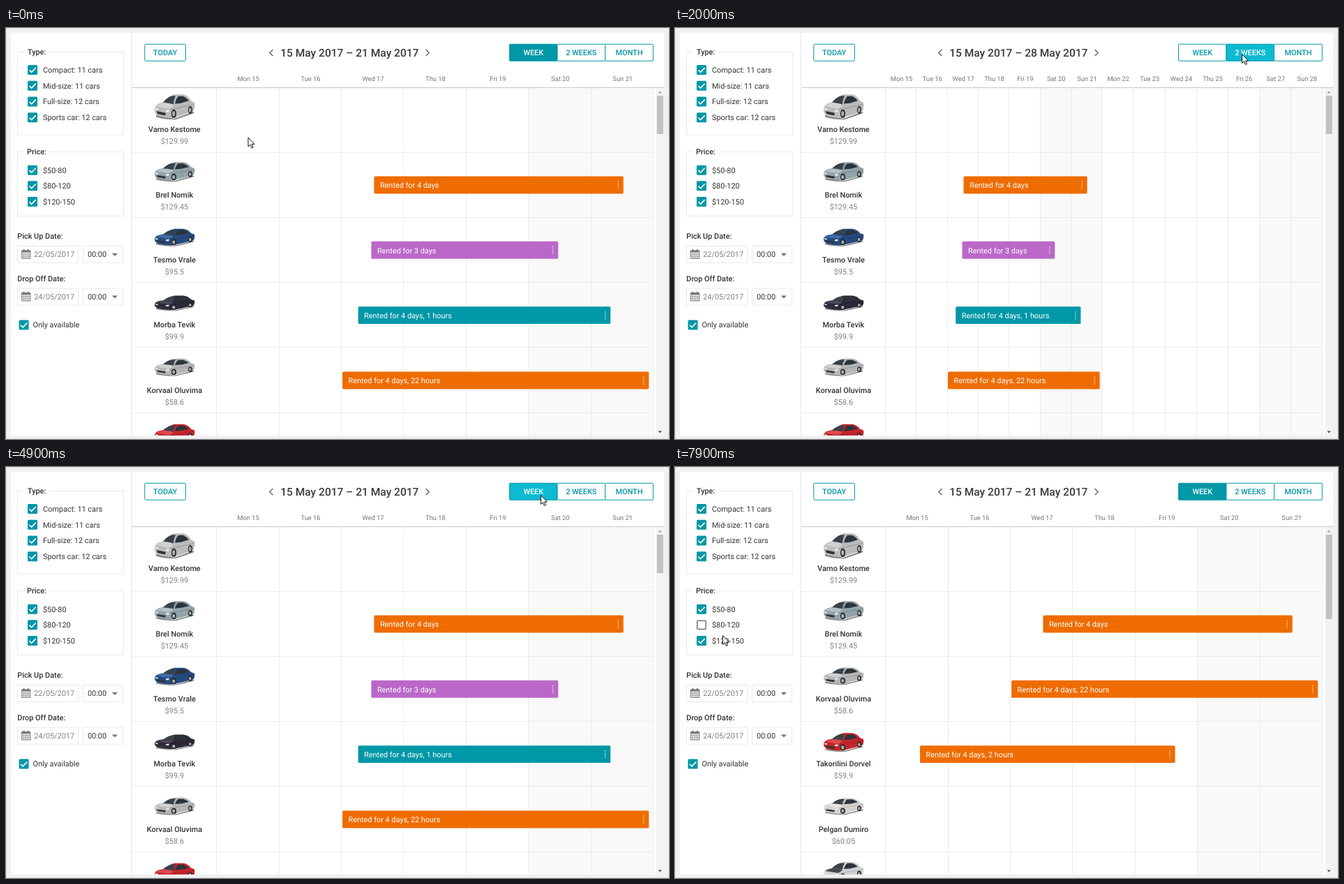
An HTML page that plays this animation: 950x589 px, repeating every 8000 ms.

```html
<!DOCTYPE html>
<html lang="en">
<head>
<meta charset="utf-8">
<title>Car rental timeline</title>
<style>
  html, body { margin: 0; width: 100%; height: 100%; overflow: hidden; background: #f1f1f1; }
  svg { display: block; width: 100vw; height: 100vh; }
  text { font: 10.885px Roboto, sans-serif; fill: #333; text-rendering: geometricPrecision; white-space: pre; }
  .mid { text-anchor: middle; }
  .med { font-weight: 500; }
  .soft { fill: #808080; }
  .day { font-size: 9.33px; fill: #757575; }
  .title { font-size: 15.55px; font-weight: 500; fill: #3a3a3a; }
  .white { fill: #fff; }
  .teal { fill: #0097a7; }
  .frame { fill: none; stroke: #e9e9e9; }
</style>
</head>
<body>
<svg id="stage" viewBox="0 0 950 589" xmlns="http://www.w3.org/2000/svg"></svg>
<script>
const TEAL = '#0097a7', HOVER = '#0cbad1', ORANGE = '#ef6c00', PURPLE = '#ba68c8';
const LEFT = 301.6, TOP = 84.7, ROW = 93.32, LOOP = 8000;

const rect = (x, y, w, h, fill, extra = '') =>
  `<rect x="${x}" y="${y}" width="${w}" height="${h}" fill="${fill}" ${extra}/>`;
const text = (x, y, str, cls = '') => `<text x="${x}" y="${y}" class="${cls}">${str}</text>`;
const path = (d, fill, extra = '') => `<path d="${d}" fill="${fill}" ${extra}/>`;
const range = (n, fn) => Array.from({ length: n }, (_, i) => fn(i)).join('');

// ---- cars and rows ----
const wheel = (x, y, rx, ry) =>
  `<ellipse cx="${x}" cy="${y}" rx="${rx}" ry="${ry}" fill="#222"/>` +
  `<ellipse cx="${x - .2}" cy="${y}" rx="${rx * .6}" ry="${ry * .62}" fill="#a9adb0"/>`;

function car(y, h, paint, roof) {
  return `<g transform="translate(211 ${y}) scale(1 ${h / 28})">` +
    path('M4 24L30 28L58 20L58 22L32 29Q16 29 4 26Z', '#333', 'opacity=".6"') +
    path('M2 18Q2 13 8 11L17 9Q24 2 31 1L43 1Q50 2 54 8L59 10Q60 15 58 19L52 21L30 27Q20 28 8 25Q2 23 2 18Z', paint) +
    path('M4 14Q9 11 16 10L29 12Q27 16 22 17Z', roof) +
    path('M14 10Q21 3 28 2.6L32 2.6Q29 8 29 12Q20 10 14 10Z', '#39424a') +
    path('M31 11.3Q33 5 36 3L43 3Q48 5 51 8L40 10.6Z', '#2c343b') +
    path('M24 18L58 12', 'none', 'stroke="#0003" stroke-width=".8"') +
    path('M5 19.5L18 21.5L17 24.5L6 22.5Z', '#30343a') +
    path('M3 16l4 .6l-.6 2l-3-.6zM18 18.4l5-.6l-1 3l-4-.4z', '#e8ecee') +
    wheel(29.5, 22.4, 3.6, 4.8) + wheel(53, 18.2, 3, 4.2) + '</g>';
}

const model = (name, price, top, h, paint, roof, bar) => ({ name, price, top, h, paint, roof, bar });
const rental = (from, to, color, label, brief) => ({ from, to, color, label, brief });

const varno = model('Varno Kestome', '$129.99', 9.3, 36, '#b9bbbc', '#d0d2d3');
const brel = model('Brel Nomik', '$129.45', 13.2, 28, '#93a3ab', '#b4c1c7',
  rental(2.525, 6.52, ORANGE, 'Rented for 4 days', 'Rented for…'));
const tesmo = model('Tesmo Vrale', '$95.5', 15.6, 25, '#254a80', '#3f6aa3',
  rental(2.48, 5.475, PURPLE, 'Rented for 3 days', 'Rente…'));
const morba = model('Morba Tevik', '$99.9', 18, 22, '#2b2838', '#4a4658',
  rental(2.27, 6.313, TEAL, 'Rented for 4 days, 1 hours', 'Rented for …'));
const korvaal = model('Korvaal Oluvima', '$58.6', 15, 25, '#b5b6b5', '#d0d1d0',
  rental(2.018, 6.928, ORANGE, 'Rented for 4 days, 22 hours', 'Rented for 4 d…'));
const takori = model('Takorilini Dorvel', '$59.9', 15.6, 27, '#c3262b', '#dc4a4c',
  rental(.553, 4.64, ORANGE, 'Rented for 4 days, 2 hours'));
const pelgan = model('Pelgan Dumiro', '$60.05', 15.6, 24, '#d3d2cd', '#e6e5e1');
const last = model('', '', 13.5, 28, '#cfd1d3', '#45484c');

const ALL = [varno, brel, tesmo, morba, korvaal, takori];
const FILTERED = [varno, brel, korvaal, takori, pelgan, last];

// ---- timeline views ----
const DAYS = ['Mon', 'Tue', 'Wed', 'Thu', 'Fri', 'Sat', 'Sun'];
const VIEWS = [
  { days: 7, first: 15, shift: 0, at: d => LEFT + d * 89.43, title: '15 May 2017 – 21 May 2017' },
  { days: 14, first: 15, shift: 0, at: d => LEFT + d * 44.32 + Math.max(0, d - 7) * .78, title: '15 May 2017 – 28 May 2017' },
  { days: 31, first: 1, shift: 14, at: d => LEFT + d * 20.2, title: '1 May 2017 – 31 May 2017' }
];

function barShape(b, y, view) {
  const x = view.at(b.from + view.shift), end = view.at(b.to + view.shift);
  return rect(x, y, end - x, 24.9, b.color, 'rx="1.6"') +
    text(x + 8.5, y + 16.7, view.days > 20 ? b.brief : b.label, 'white') +
    range(4, i => rect(end - 8.2, y + 7.1 + i * 3.2, 1.3, 1.5, '#fff', 'opacity=".85"'));
}

function scene(view, cars) {
  const line = 'stroke="#ebebeb"';
  let grid = '', heads = '';
  for (let d = 0; d < view.days; d++) {
    const x = view.at(d), next = view.at(d + 1), mid = (x + next) / 2;
    if (d % 7 > 4) grid += rect(x, 86, next - x, 498, '#f9f9f9');
    const name = DAYS[d % 7], num = view.first + d;
    heads += view.days > 20
      ? text(mid, 64.6, name.slice(0, 2), 'day mid') + text(mid, 76.2, num, 'day mid')
      : text(mid + .8, 76.2, name + ' ' + num, 'day mid');
  }
  grid += range(view.days + 1, d => {
    const x = Math.floor(view.at(d)) + .5;
    return path(`M${x} 86V584`, 'none', line);
  });
  const rows = cars.map((c, i) => {
    const y = TOP + i * ROW;
    return (i ? path(`M181 ${Math.floor(y) + .5}H928`, 'none', line) : '') +
      car(y + c.top, c.h, c.paint, c.roof) +
      text(241.4, y + 64.7, c.name, 'med mid') +
      text(241.4, y + 81.7, c.price, 'soft mid') +
      (c.bar && i < 5 ? barShape(c.bar, y + 34.5, view) : '');
  }).join('');
  return `<g class="scene" display="none"><g clip-path="url(#body)">${grid}${rows}</g>` +
    heads + text(492.3, 40.6, view.title, 'title mid') + '</g>';
}

// ---- side panel ----
const check = (x, y) => rect(x, y, 14, 14, TEAL, 'rx="1.5"') +
  path(`M${x + 2.4} ${y + 7.2}l3.2 3.2l6-6.3`, 'none', 'stroke="#fff" stroke-width="1.6"');
const option = (y, label) => check(31, y - 7) + text(53, y + 3.9, label);

function fieldset(y, h, x, legend, gap) {
  return rect(16.5, y, 152, h, 'none', 'class="frame"') +
    rect(x - 5, y - 4, gap, 8, '#fff') + text(x, y + 3.8, legend, 'med');
}

function dateField(y, label, date) {
  return text(16.3, y - 9.8, label, 'med') +
    rect(16.5, y + .5, 87, 24, 'none', 'class="frame"') +
    rect(110.5, y + .5, 57, 24, 'none', 'class="frame"') +
    rect(22.7, y + 7.5, 12, 10.7, 'none', 'stroke="#777" stroke-width="1.1"') +
    rect(22.3, y + 6.5, 12.8, 3, '#777') +
    path(`M25.6 ${y + 5}v3.2M31.8 ${y + 5}v3.2`, 'none', 'stroke="#777" stroke-width="1.8"') +
    path(`M23 ${y + 12.2}h12M23 ${y + 15.1}h12M25.7 ${y + 9}v9M28.7 ${y + 9}v9M31.7 ${y + 9}v9`, 'none', 'stroke="#777" stroke-width=".7"') +
    text(40.2, y + 16.3, date, 'soft') + text(117, y + 16.3, '00:00') +
    path(`M151.8 ${y + 10.7}h8.2l-4.1 4.2z`, '#757575');
}

const side = fieldset(34.5, 118.5, 31, 'Type:', 36) +
  ['Compact: 11 cars', 'Mid-size: 11 cars', 'Full-size: 12 cars', 'Sports car: 12 cars']
    .map((s, i) => option(60 + i * 22.75, s)).join('') +
  fieldset(177.5, 92, 30, 'Price:', 38) +
  ['$50-80', '$80-120', '$120-150'].map((s, i) => option(203.7 + i * 22.65, s)).join('') +
  `<g id="off">${rect(30, 218, 16, 16, '#fff')}${rect(31.8, 220.2, 12.4, 12.4, '#fff', 'rx="1" stroke="#757575" stroke-width="1.5"')}</g>` +
  dateField(312, 'Pick Up Date:', '22/05/2017') +
  dateField(372.7, 'Drop Off Date:', '24/05/2017') +
  check(18.6, 418.5) + text(38.6, 429, 'Only available');

// ---- header and scrollbar ----
const BUTTONS = [[721.5, 790, 'WEEK'], [790, 858.5, '2 WEEKS'], [858.5, 927.3, 'MONTH']];
const chevron = (x, dx) => path(`M${x} 31l${dx} 4.5l${-dx} 4.5`, 'none', 'stroke="#666" stroke-width="1.4"');
const header = rect(198.8, 23.2, 58.6, 24, '#fff', `rx="1.6" stroke="${TEAL}"`) +
  text(228, 39.2, 'TODAY', 'med mid teal') + chevron(382.4, -4.6) + chevron(601.6, 4.6) +
  BUTTONS.map(([x, end, label]) => '<g class="button">' +
    rect(x, 23.2, end - x, 24, '#fff', `stroke="${TEAL}" rx="1"`) +
    text((x + end) / 2, 39.4, label, 'med mid') + '</g>').join('');
const scrollbar = rect(931.5, 86, 11.5, 498, '#f3f3f3') +
  rect(932.7, 97, 9, 55, '#c1c1c1', 'id="thumb"') +
  path('M934.4 93.4h5.4l-2.7-3z', '#a0a0a0') + path('M934.4 577.4h5.4l-2.7 3z', '#505050');

const pen = 'stroke="#111" stroke-width="1" stroke-linejoin="round"';
const cursor = '<g id="cursor">' +
  path('M.5.5V13.4L3.4 10.7L5.4 15.4L7.5 14.5L5.6 10H9.5Z', '#fff', pen) +
  path('M1.2 7V1a1.1 1.1 0 0 1 2.2 0V4.4l5 .8q1.1.3 1 1.6l-1 5.4H1.8L-2.6 7.2q.3-1.7 1.8-.9zM5 5v2M7 5.4v2', '#fff', pen) + '</g>';

const stage = document.getElementById('stage');
stage.innerHTML = `<defs><clipPath id="body">${rect(181, 86, 762, 498, '#fff')}</clipPath></defs>` +
  rect(.5, .5, 949, 588, '#f1f1f1', 'stroke="#e4e4e4"') +
  rect(7, 7, 172, 577, '#fff') + rect(181, 7, 762, 577, '#fff') + side +
  VIEWS.map(v => scene(v, ALL)).join('') + scene(VIEWS[0], FILTERED) +
  rect(181, 84.8, 762, 1.3, '#cfcfcf') + header + scrollbar + cursor;

// ---- motion ----
const SCENES = [[0, 0], [2000, 1], [3400, 2], [4800, 0], [7800, 3]];   // time, scene
const MOVES = [                                                       // time, steps, x, y, ease-out power
  [600, 5, 685, 106, 2], [1300, 6, 812, 37, 2], [3400, 1, 877, 35, 1],
  [4000, 7, 766, 40, 2], [5600, 4, 473, 122, 2.5], [6400, 4, 184, 189, 4.3],
  [7100, 5, 82, 224, 2], [7900, 1, 68, 241, 1]
];

function cursorAt(t) {
  let x = 346.5, y = 156.5;
  for (const [start, steps, tx, ty, power] of MOVES) {
    if (t < start) break;
    const k = Math.min(1, (Math.floor((t - start) / 100) + 1) / steps);
    const f = 1 - (1 - k) ** power;
    x += (tx - x) * f;
    y += (ty - y) * f;
  }
  return [x, y];
}

const scenes = [...stage.querySelectorAll('.scene')];
const buttons = [...stage.querySelectorAll('.button')];
const [off, thumb, pointer] = ['off', 'thumb', 'cursor'].map(id => document.getElementById(id));
const show = (el, on) => el.setAttribute('display', on ? 'inline' : 'none');

function draw(t) {
  const current = SCENES.filter(s => s[0] <= t).pop()[1];
  const [x, y] = cursorAt(t);
  scenes.forEach((el, i) => show(el, i === current));
  let over = false;
  buttons.forEach((el, i) => {
    const [a, b] = BUTTONS[i];
    const hot = x >= a && x < b && y >= 23 && y <= 47.5;
    const active = i === current % 3;
    over = over || hot;
    el.firstChild.setAttribute('fill', hot ? HOVER : active ? TEAL : '#fff');
    el.lastChild.style.fill = hot || active ? '#fff' : TEAL;
  });
  const clicked = t >= 2000 && t < 4000 || t >= 4900 && t < 5600;
  const hand = over && !clicked;
  pointer.setAttribute('transform', `translate(${x} ${y})`);
  show(pointer.firstChild, !hand);
  show(pointer.lastChild, hand);
  show(off, t >= 7700);
  thumb.setAttribute('height', current === 3 ? 121 : 55);
}

const began = performance.now();
function tick() {
  draw((performance.now() - began) % LOOP);
  requestAnimationFrame(tick);
}
tick();
</script>
</body>
</html>
```
